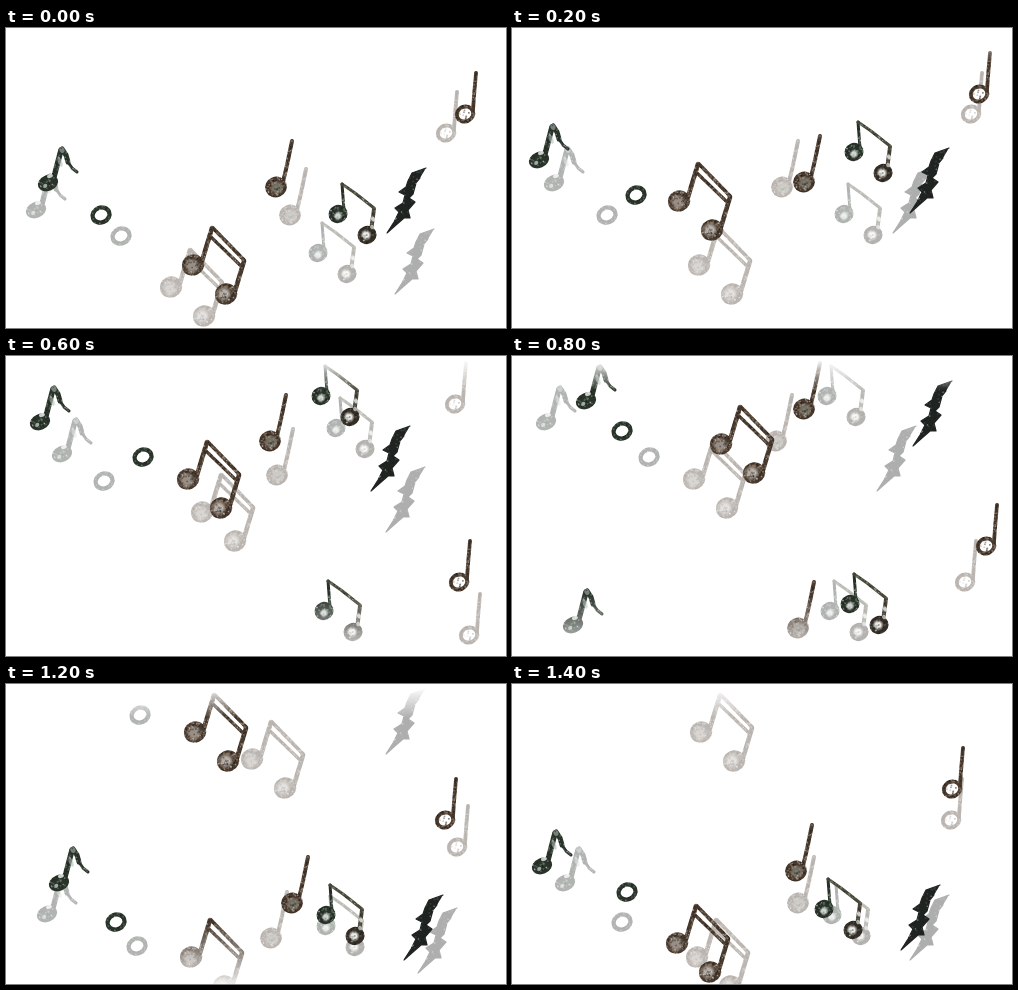
An HTML page with a canvas that plays this animation: 500 px wide and 300 px high, repeating every 1.6 s.

```html
<!DOCTYPE html>
<html lang="en">
<head>
<meta charset="utf-8">
<title>Floating notes</title>
<style>
html, body { margin: 0; width: 100%; height: 100%; overflow: hidden; background: #fff; }
canvas { display: block; }
</style>
</head>
<body>
<canvas id="stage" width="500" height="300"></canvas>
<script>
const ctx = document.getElementById('stage').getContext('2d');
const STEP = 200, STEPS = 8, GHOST = 0.36;
const OX = 20, OY = 75, SW = 96, SH = 128;
const BROWN = '#493a2e', GREEN = '#29332a', INK = '#202421';

let seed = 11;
function rand() {
  seed = (seed * 16807) % 2147483647;
  return seed / 2147483647;
}

function line(g, color, width, ...pts) {
  g.strokeStyle = color;
  g.lineWidth = width;
  g.beginPath();
  for (let i = 0; i < pts.length; i += 2) g.lineTo(pts[i], pts[i + 1]);
  g.stroke();
}

function oval(g, x, y, rx, ry, turn = -0.4) {
  g.beginPath();
  g.ellipse(x, y, rx, ry, turn, 0, Math.PI * 2);
}

function blob(g, color, x, y, rx, ry) {
  oval(g, x, y, rx, ry);
  g.fillStyle = color;
  g.fill();
}

function ring(g, color, rx, ry, width) {
  oval(g, 0, 0, rx, ry);
  g.strokeStyle = color;
  g.lineWidth = width;
  g.stroke();
}

// Solid note head with a soft glint
function head(g, color, x, y, r, glint, dx, dy, size) {
  blob(g, color, x, y, r, r * 0.94);
  const shine = g.createRadialGradient(x + dx, y + dy, 0, x + dx, y + dy, size);
  shine.addColorStop(0, glint);
  shine.addColorStop(0.45, glint);
  shine.addColorStop(1, 'rgba(200,195,190,0)');
  g.fillStyle = shine;
  g.fill();
}

// Grainy pencil look inside the drawn shape, slightly worn edges
function grain(g, light, amount) {
  g.globalCompositeOperation = 'source-atop';
  for (let i = 0; i < amount; i++) {
    g.fillStyle = rand() < 0.5 ? light : 'rgba(20,16,12,0.4)';
    g.fillRect(rand() * SW - OX, rand() * SH - OY, 1.6, 1.6);
  }
  g.globalCompositeOperation = 'destination-out';
  g.fillStyle = 'rgba(0,0,0,0.4)';
  for (let i = 0; i < amount / 5; i++) {
    g.fillRect(rand() * SW - OX, rand() * SH - OY, 1.3, 1.3);
  }
}

function sprite(draw, light, amount) {
  const c = document.createElement('canvas');
  c.width = SW;
  c.height = SH;
  const g = c.getContext('2d');
  g.translate(OX, OY);
  g.lineCap = g.lineJoin = 'round';
  draw(g);
  grain(g, light, amount);
  return c;
}

const TAN = 'rgba(165,145,122,0.45)', MOSS = 'rgba(120,145,120,0.45)';

const eighth = sprite(g => {
  line(g, GREEN, 5.5, 5, -6, 12, -33);
  line(g, GREEN, 5, 13, -34, 17, -28, 19, -21);
  line(g, GREEN, 3, 19, -21, 23, -15, 28, -11);
  blob(g, GREEN, -1, 0, 10.5, 8);
  blob(g, 'rgba(225,230,228,0.85)', 1, -7, 3, 2);
  blob(g, 'rgba(200,210,205,0.75)', -4, 3, 2.4, 2);
  blob(g, 'rgba(180,190,186,0.6)', 11, -21, 2, 5);
  blob(g, 'rgba(170,180,175,0.6)', 13, -33, 2.5, 3);
}, MOSS, 1500);

const whole = sprite(g => ring(g, GREEN, 8.6, 7.4, 4.4), MOSS, 1700);

const beamed = sprite(g => {
  line(g, BROWN, 4.6, 9, -4, 19, -37);
  line(g, BROWN, 4.6, 42, 26, 51, -4);
  line(g, BROWN, 3.8, 20, -37, 51, -5);
  line(g, BROWN, 3.2, 18, -28, 48, 1);
  head(g, BROWN, 0, 0, 11.3, 'rgba(165,157,150,0.85)', -1, 1, 8);
  head(g, BROWN, 33, 29, 11.3, 'rgba(195,190,184,0.9)', -2, 0, 8);
}, TAN, 2600);

const quarter = sprite(g => {
  line(g, BROWN, 4, 7, -5, 11, -22, 16, -46);
  head(g, BROWN, 0, 0, 11, 'rgba(125,130,118,0.75)', 1, 1, 7);
}, TAN, 2600);

const pair = sprite(g => {
  line(g, GREEN, 3, 6, -4, 4, -30);
  line(g, '#4b4a3a', 3, 4, -30, 17, -21, 36, -6);
  line(g, '#4c4238', 4, 33, 17, 36, -5);
  head(g, GREEN, 0, 0, 9.6, 'rgba(225,232,228,0.9)', 0, 2, 5);
  head(g, '#352e27', 29, 21, 9.6, 'rgba(245,245,243,0.95)', -1, 0, 6);
  blob(g, 'rgba(230,230,228,0.85)', 35, 5, 2, 2.6);
  blob(g, 'rgba(220,225,222,0.8)', 34, 13, 1.8, 2.2);
}, MOSS, 1700);

const rest = sprite(g => {
  const pts = [[39, -65], [25, -60], [21, -52], [19, -46], [12, -41], [18, -38], [16, -30],
    [8, -25], [12, -21], [7, -11], [0, 0], [9, -8], [17, -15], [23, -15], [21, -23],
    [28, -31], [22, -35], [26, -39], [29, -50], [33, -55]];
  g.beginPath();
  pts.forEach(p => g.lineTo(...p));
  g.closePath();
  g.fillStyle = INK;
  g.fill();
  line(g, INK, 1.2, ...pts.flat());
}, 'rgba(100,115,105,0.3)', 700);

const half = sprite(g => {
  line(g, BROWN, 3.8, 8, -4, 9, -18, 11, -41);
  blob(g, '#fff', 0, 0, 8, 7);
  ring(g, BROWN, 8.4, 7.4, 4);
}, TAN, 2400);

// Each note climbs one place per step, beginning at its own step of the loop
const notes = [
  { art: eighth, start: 4, path: [[62, 269], [42, 230], [54, 199], [31, 182], [43, 155], [28, 132], [57, 98], [35, 66], [75, 45]] },
  { art: whole, start: 5, path: [[131, 262], [110, 238], [115, 208], [95, 187], [124, 167], [98, 125], [137, 101], [110, 75], [134, 31]] },
  { art: beamed, start: 6, path: [[185, 273], [165, 259], [187, 237], [167, 173], [196, 156], [182, 123], [209, 88], [246, 75], [189, 48]] },
  { art: quarter, start: 4, path: [[286, 272], [265, 254], [286, 219], [284, 187], [270, 159], [292, 154], [271, 119], [264, 85], [292, 53]] },
  { art: pair, start: 3, path: [[318, 255], [338, 248], [320, 242], [320, 231], [312, 225], [332, 186], [342, 124], [330, 72], [315, 40]] },
  { art: rest, start: 5, path: [[412, 289], [398, 276], [389, 266], [381, 205], [398, 185], [380, 176], [365, 135], [401, 90], [380, 70]] },
  { art: half, start: 2, path: [[463, 279], [453, 226], [474, 190], [451, 163], [439, 136], [440, 105], [459, 86], [467, 66], [449, 48]] }
];

const layer = document.createElement('canvas');
layer.width = SW;
layer.height = SH;
const lg = layer.getContext('2d');

// A note that has just appeared dissolves towards the bottom edge
function emerging(art, y) {
  const top = y - OY;
  const mask = lg.createLinearGradient(0, 238 - top, 0, 300 - top);
  mask.addColorStop(0, 'rgba(0,0,0,1)');
  mask.addColorStop(0.5, 'rgba(0,0,0,0.6)');
  mask.addColorStop(1, 'rgba(0,0,0,0.1)');
  lg.globalCompositeOperation = 'copy';
  lg.drawImage(art, 0, 0);
  lg.globalCompositeOperation = 'destination-in';
  lg.fillStyle = mask;
  lg.fillRect(0, 0, SW, SH);
  return layer;
}

function drawNotes(step, ghost) {
  ctx.globalAlpha = ghost ? GHOST : 1;
  for (const { art, start, path } of notes) {
    path.forEach(([x, y], i) => {
      if ((start + i) % STEPS !== step) return;
      const img = i === 0 && !ghost ? emerging(art, y) : art;
      ctx.drawImage(img, x - OX, y - OY);
    });
  }
  ctx.globalAlpha = 1;
}

const haze = ctx.createLinearGradient(0, 3, 0, 34);
haze.addColorStop(0, 'rgba(255,255,255,1)');
haze.addColorStop(0.4, 'rgba(255,255,255,0.6)');
haze.addColorStop(1, 'rgba(255,255,255,0)');

function render(step) {
  ctx.fillStyle = '#fff';
  ctx.fillRect(0, 0, 500, 300);
  drawNotes((step + STEPS - 1) % STEPS, true);
  drawNotes(step, false);
  ctx.fillStyle = haze;
  ctx.fillRect(0, 0, 500, 34);
}

const begin = performance.now();
function tick() {
  render(Math.floor((performance.now() - begin) / STEP) % STEPS);
  requestAnimationFrame(tick);
}
tick();
</script>
</body>
</html>
```
